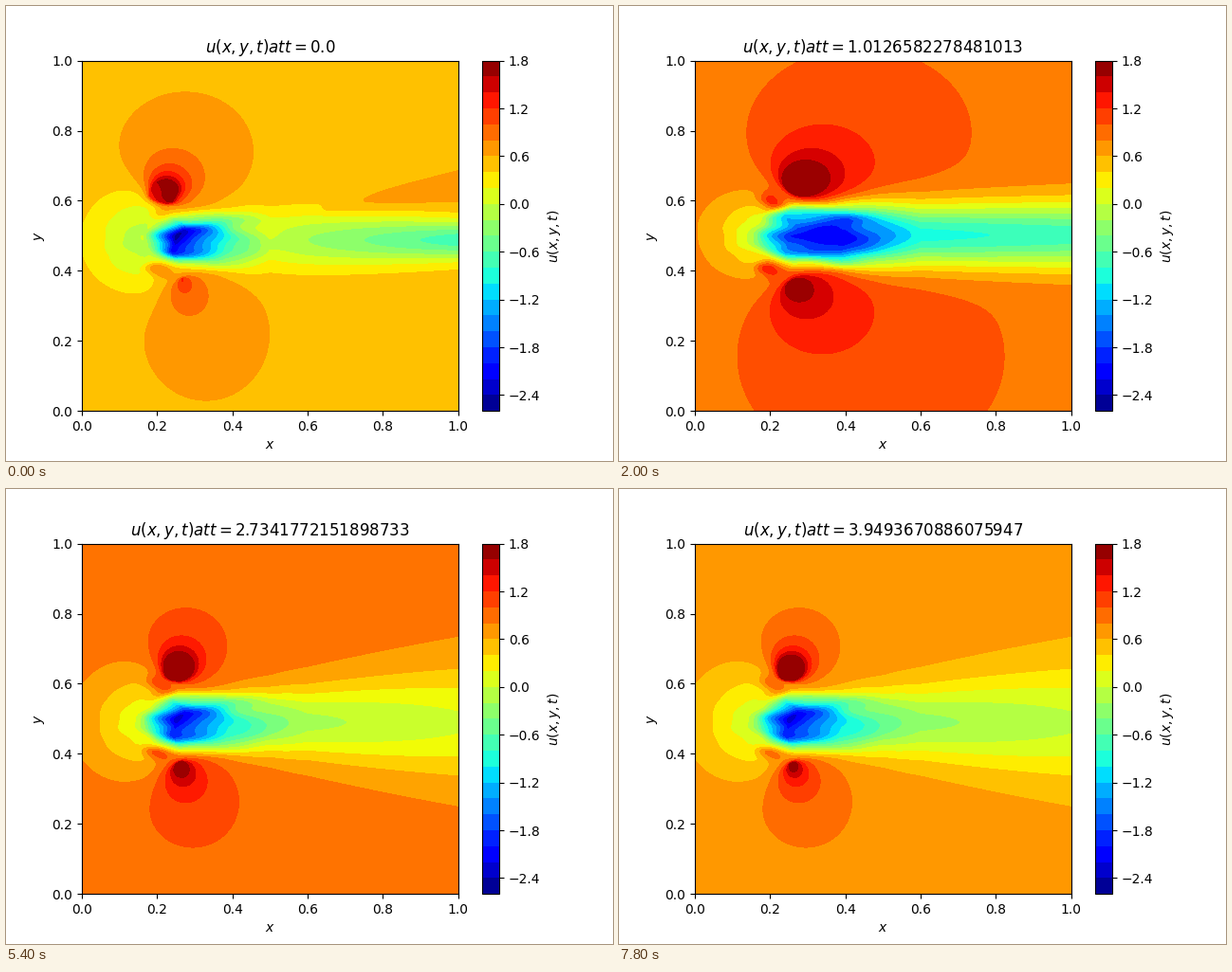
A matplotlib script for the animation above (8000 ms loop, 640 by 480 pixels).

```python
import numpy as np
import matplotlib.pyplot as plt
from matplotlib.animation import FuncAnimation

FRAMES = 40
STEP_MS = 200
TIMES = np.linspace(0, 8, 80)

# Regimes of the flow, speeds in tenths.
#   base, rim    far speed and speed on the outline of the two fast lobes
#   fall, lean   decay of speed away from the lobe tips, downstream lean
#   top, low     lobe outlines: centre x, y and radii
#   axis, width  height of the wake and its half width near, mid, far
#   core         speed along the wake axis at CORE_X
#   nose, jet    size of the slow patch upstream, strength of the side jet
START = dict(base=5, rim=6, fall=1.5, lean=.38, top=(.275, .74, .18, .17), low=(.33, .22, .168, .19),
             axis=.488, width=(.062, .085, .055), core=(0, -24, -7, 0, -2, -7.4), nose=.125, jet=1)
SURGE = dict(base=9, rim=12, fall=.85, lean=.6, top=(.32, .71, .12, .107), low=(.32, .285, .13, .108),
             axis=.503, width=(.076, .083, .068), core=(-4, -16, -15, -7, -.5, -1.4), nose=.11, jet=1)
FULL = dict(base=8, rim=12, fall=.9, lean=.6, top=(.34, .705, .138, .112), low=(.338, .285, .138, .122),
            axis=.502, width=(.078, .086, .094), core=(-4, -14.5, -18, -12, -6.8, -5.1), nose=.09, jet=0)
LATE = dict(base=8.5, rim=10, fall=1.7, lean=.3, top=(.277, .707, .108, .109), low=(.295, .263, .122, .13),
            axis=.49, width=(.072, .085, .155), core=(-4, -20, -8, -3.5, -.6, 1.7), nose=.125, jet=0)

CORE_X = (.17, .25, .4, .5, .6, 1)
KEYS = (0, 3, 10, 18, 27, 39)
REGIMES = (START, SURGE, FULL, FULL, LATE, LATE)

X, Y = np.meshgrid(np.linspace(0, 1, 260), np.linspace(0, 1, 240))
rng = np.random.default_rng(11)


def streaks(n=22):
    """Random pattern of thin, mostly horizontal streaks."""
    waves = zip(rng.normal(0, 22, n), rng.uniform(25, 130, n), rng.uniform(0, 2 * np.pi, n))
    return sum(np.sin(kx * X + ky * Y + p) for kx, ky, p in waves) / np.sqrt(n)


near = np.exp(-((X - .28) / .2) ** 4 - ((Y - .49) / .11) ** 4)
WX = X + .011 * near * streaks()
WY = Y + .004 * near * streaks()
GRAIN = 1.6 * streaks()


def regime(k):
    i = min(np.searchsorted(KEYS, k, side="right") - 1, len(KEYS) - 2)
    f = (k - KEYS[i]) / (KEYS[i + 1] - KEYS[i])
    a, b = REGIMES[i], REGIMES[i + 1]
    return {n: np.array(a[n]) * (1 - f) + np.array(b[n]) * f for n in a}


def bump(x, y, cx, cy, r):
    return np.exp(-((x - cx) ** 2 + (y - cy) ** 2) / r ** 2)


def lobe(shape, lean, side):
    """Size of the nested ellipse through each point; 1 on the outline, 0 at the tip."""
    cx, cy, rx, ry = shape
    reach = .82
    dx, dy = lean, side * np.sqrt(reach - lean ** 2)
    vx, vy = (WX - cx) / rx + dx, (WY - cy) / ry + dy
    dot = vx * dx + vy * dy
    return (np.sqrt(dot ** 2 + (1 - reach) * (vx ** 2 + vy ** 2)) - dot) / (1 - reach)


def speed(k):
    s = regime(k)
    base, rise = s["base"], s["rim"] - s["base"]

    # fast lobes above and below the body, with hot spots at its edges
    top = np.maximum(lobe(s["top"], s["lean"], 1), .05) ** -s["fall"]
    low = (1.35 / (lobe(s["low"], s["lean"], -1) + .35)) ** s["fall"]
    u = base + rise * np.maximum(top, low)
    u += 5 * (bump(WX, WY, .2, .595, .03) + bump(WX, WY, .205, .41, .03))
    u = np.minimum(u, 17.5 + 2 * np.clip((k - 33) / 6, 0, 1))

    # side jet above the far wake
    t = np.clip((X - .62) / .38, 0, 1)
    u += 1.8 * s["jet"] * np.clip(10 * t, 0, 1) * np.exp(-((Y - .57 - .065 * t) / (.012 + .048 * t)) ** 2)

    # slow patch in front of the body
    ahead = np.where(WX > .16, 2.5, 1) * (WX - .16)
    u += .85 * (base - 7 - u) * bump(ahead, WY, 0, s["axis"], s["nose"])

    # wake: sharp-edged at the body, bell-shaped downstream
    h = np.abs(WY - s["axis"])
    w = np.interp(WX, (.17, .25, .5, 1), (.75 * s["width"][0], *s["width"]))
    power = 2 + 2.5 * np.exp(-((X - .25) / .15) ** 2)
    onset = 1 / (1 + np.exp((.165 + 4 * h ** 2 - WX) / .009))
    axis_speed = np.interp(WX, CORE_X, s["core"]) + GRAIN * near
    return u + (axis_speed - u) * onset * np.exp(-(h / w) ** power)


def even(k, values):
    return 2 * round(np.interp(k, (0, 3, 10, 18, 27, 33, 39), values) / 2)


def draw(k):
    lo = even(k, (-26, -18, -22, -22, -24, -24, -24))
    hi = even(k, (18, 18, 18, 18, 18, 18, 20))
    u = np.clip(speed(k), lo + .01, hi - .01)
    ax.set_title(f"$u(x, y, t) at t={TIMES[k]}$")
    return ax.contourf(X, Y, u / 10, levels=np.arange(lo, hi + 1, 2) / 10, cmap="jet")


fig, ax = plt.subplots(figsize=(6.4, 4.8), dpi=100)
shown = [draw(0)]
bar = fig.colorbar(shown[0], ax=ax, ticks=np.arange(-2.4, 1.9, .6))
bar.set_label("$u(x, y, t)$")
ax.set(xlabel="$x$", ylabel="$y$", xlim=(0, 1), ylim=(0, 1))


def update(k):
    shown[0].remove()
    shown[0] = draw(k)
    return []


anim = FuncAnimation(fig, update, frames=FRAMES, init_func=lambda: [], interval=STEP_MS,
                     repeat=True, repeat_delay=0, blit=False)
plt.show()
```
